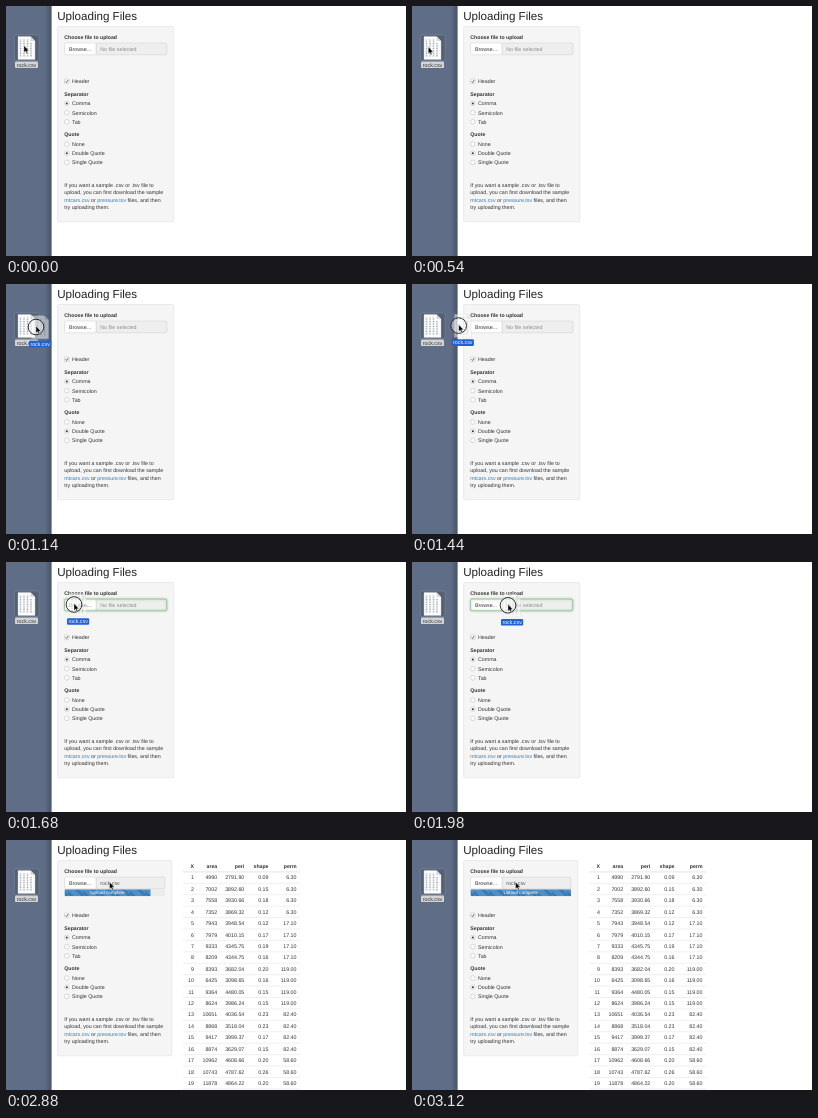
Write an HTML page that moves like this. It is 400x250 px and loops after 4.12 s.

```html
<!DOCTYPE html>
<html lang="en">
<head>
<meta charset="utf-8">
<title>Uploading Files</title>
<style>
html, body { margin: 0; width: 100%; height: 100%; overflow: hidden; background: #fff; }
svg { display: block; }
text { font: 5.3px "Liberation Sans", Arial, sans-serif; fill: #333; text-rendering: geometricPrecision; white-space: pre; }
.b { font-weight: bold; font-size: 5.2px; }
.h { font-size: 11.6px; fill: #222; }
.m { text-anchor: middle; }
.e { text-anchor: end; }
.link { fill: #337ab7; }
</style>
</head>
<body>
<svg id="stage" width="400" height="250" viewBox="0 0 400 250">
  <defs>
    <linearGradient id="edge"><stop stop-color="#222b3a" stop-opacity="0"/><stop offset="1" stop-color="#222b3a" stop-opacity=".4"/></linearGradient>
    <pattern id="stripes" width="15.5" height="15.5" patternUnits="userSpaceOnUse">
      <path d="M0 0H3.9L15.5 11.6V15.5H11.6L0 3.9ZM7.75 0H11.6L15.5 3.9V7.75ZM0 7.75L7.75 15.5H3.9L0 11.6Z" fill="#fff" opacity=".16"/>
    </pattern>
    <clipPath id="track"><rect x="58.5" y="49.3" width="102.5" height="7" rx="1"/></clipPath>
    <g id="doc">
      <path d="M12 30.5H24.5L29 35V53.5H12Z" fill="#fdfdfd" stroke="#c4c7cc" stroke-width=".4"/>
      <path d="M24.5 30.5V35H29Z" fill="#d5d8dc"/>
      <path d="M14.5 33.5V51M18 33.5V51M21.5 33.5V51M25 37V51" stroke="#a9adb3" stroke-width="1.5" stroke-dasharray="1 .7"/>
    </g>
  </defs>

  <rect width="45.5" height="250" fill="#5f6e86"/>
  <rect x="39" width="6.5" height="250" fill="url(#edge)"/>
  <rect x="8.5" y="29" width="24.5" height="25.5" rx="1.5" fill="#4c5668" fill-opacity=".6" stroke="#8b94a3" stroke-width=".4"/>
  <use href="#doc"/>
  <rect x="9" y="55.5" width="23" height="6.6" rx="1.2" fill="#d2d4d7"/>
  <text class="m" x="20.5" y="60.6">rock.csv</text>

  <text class="h" x="51.2" y="14">Uploading Files</text>
  <rect id="panel" x="51.6" y="20.6" height="195.2" rx="1.2" fill="#f5f5f5" stroke="#e0e0e0" stroke-width=".6"/>
  <g id="form"></g>
  <rect id="field" x="90" y="37" height="11.8" rx="1" fill="#eee" stroke="#ccc" stroke-width=".5"/>
  <rect x="58.5" y="37" width="31.5" height="11.8" rx="1.3" fill="#fff" stroke="#ccc" stroke-width=".5"/>
  <text x="63" y="44.9">Browse...</text>
  <text id="value" x="94.3" y="44.9"></text>
  <rect id="glow" x="58.5" y="37" width="102.3" height="11.8" rx="1.3" fill="none" stroke="#8fbf8f" stroke-width=".7" style="filter:drop-shadow(0 0 1.2px rgba(76,174,76,.7))"/>

  <g id="progress" clip-path="url(#track)">
    <rect id="rail" x="58.5" y="49.3" height="7" fill="#ececec"/>
    <rect class="bar" x="58.5" y="49.3" height="7" fill="#337ab7"/>
    <rect class="bar" x="58.5" y="49.3" height="7" fill="url(#stripes)"/>
    <text id="done" class="m" y="54.4" style="fill:#fff;font-size:4.6px">Upload complete</text>
  </g>
  <g id="table"></g>

  <g id="ghost">
    <use href="#doc" opacity=".5"/>
    <rect x="9.4" y="55.5" width="22.2" height="6.6" rx="1.2" fill="#2161d2"/>
    <text class="m" x="20.5" y="60.5" style="fill:#fff">rock.csv</text>
  </g>
  <g id="pointer">
    <circle id="ring" r="7.8" fill="#fff" fill-opacity=".45" stroke="#1c1c1c" stroke-width=".9"/>
    <path d="M0 -1V6L1.6 4.6L2.7 7L3.8 6.5L2.8 4.2H4.9Z" fill="#000" stroke="#fff" stroke-width=".4"/>
  </g>
</svg>
<script>
const $ = id => document.getElementById(id);
const text = (x, y, s, cls = '') => `<text x="${x}" y="${y}" class="${cls}">${s}</text>`;
const set = (el, attrs) => { for (const k in attrs) el.setAttribute(k, attrs[k]); };
const show = (id, on) => { $(id).style.display = on ? '' : 'none'; };

// Form
const radio = (y, label, on) =>
  `<circle cx="60.8" cy="${y}" r="2.3" fill="#fff" stroke="#b5b5b5" stroke-width=".5"/>` +
  (on ? `<circle cx="60.8" cy="${y}" r="1" fill="#333"/>` : '') + text(66, y + 1.9, label);
$('form').innerHTML =
  text(58.3, 33, 'Choose file to upload', 'b') +
  '<rect x="58.5" y="73" width="4.6" height="4.6" rx=".8" fill="#fff" stroke="#b5b5b5" stroke-width=".5"/>' +
  '<path d="M59.6 75.3L60.6 76.5L62.2 74" fill="none" stroke="#333" stroke-width=".7"/>' +
  text(66, 77.2, 'Header') +
  text(58.3, 90, 'Separator', 'b') +
  radio(97.4, 'Comma', true) + radio(106.6, 'Semicolon') + radio(115.8, 'Tab') +
  text(58.3, 130.4, 'Quote', 'b') +
  radio(138, 'None') + radio(147.2, 'Double Quote', true) + radio(156.4, 'Single Quote') +
  ['If you want a sample .csv or .tsv file to',
   'upload, you can first download the sample',
   '<tspan class="link">mtcars.csv</tspan> or <tspan class="link">pressure.tsv</tspan> files, and then',
   'try uploading them.'].map((s, i) => text(58.3, 181 + i * 7.3, s)).join('');

// Table
const area = [4990, 7002, 7558, 7352, 7943, 7979, 9333, 8209, 8393, 6425, 9364, 8624, 10651, 8868, 9417, 8874, 10962, 10743, 11878];
const peri = [2791.9, 3892.6, 3930.66, 3869.32, 3948.54, 4010.15, 4345.75, 4344.75, 3682.04, 3098.65, 4480.05, 3986.24, 4036.54, 3518.04, 3999.37, 3629.07, 4608.66, 4787.62, 4864.22];
const shape = [9, 15, 18, 12, 12, 17, 19, 16, 20, 16, 15, 15, 23, 23, 17, 15, 20, 26, 20];
const perm = [6.3, 17.1, 119, 82.4, 58.6];
const row = (cells, y, cls) => cells.map((s, i) => text([188, 211.2, 238.3, 262.5, 290.5][i], y, s, 'e ' + cls)).join('');
const rule = (y, w) => `<path d="M177 ${y}H294" stroke="#ddd" stroke-width="${w}"/>`;
$('table').innerHTML = row(['X', 'area', 'peri', 'shape', 'perm'], 27.6, 'b') + rule(31.9, .8) +
  area.map((a, i) => {
    const y = 37.5 + i * 11.42;
    return row([i + 1, a, peri[i].toFixed(2), (shape[i] / 100).toFixed(2), perm[i >> 2].toFixed(2)], y + 1.9, '') + rule(y + 5.8, .45);
  }).join('');

// Pointer path: time, x, y
const path = [
  [0, 18, 40.5], [260, 23.5, 46], [540, 16.3, 41.8], [720, 16.3, 41.8], [900, 20.7, 42.6], [1140, 30, 43],
  [1440, 46.7, 41.6], [1680, 68, 42.5], [1980, 96, 43.3], [2200, 103.5, 43]
];
function pointerAt(t) {
  const i = path.findIndex(p => p[0] > t);
  if (i < 0) return path[path.length - 1].slice(1);
  const [a, b] = [path[i - 1], path[i]], k = (t - a[0]) / (b[0] - a[0]);
  return [1, 2].map(j => a[j] + (b[j] - a[j]) * k);
}

// CSS "ease" curve
function ease(x) {
  const bez = (p, q, s) => 3 * p * s * (1 - s) ** 2 + 3 * q * s * s * (1 - s) + s ** 3;
  let lo = 0, hi = 1;
  for (let i = 0; i < 20; i++) {
    const mid = (lo + hi) / 2;
    if (bez(.25, .25, mid) < x) lo = mid; else hi = mid;
  }
  return bez(.1, 1, lo);
}

const GRAB = 720, DROP = 2560, LOADED = 2700;

function draw(t) {
  const [x, y] = pointerAt(t);
  set($('pointer'), { transform: `translate(${x} ${y})` });
  set($('ghost'), { transform: `translate(${x - 16.4} ${y - 41.8})` });
  show('ring', t >= 660 && t < 2200);
  show('ghost', t >= GRAB && t < DROP);
  show('glow', t >= 1600 && t < DROP);

  const dropped = t >= DROP, loaded = t >= LOADED, right = loaded ? 159 : 161;
  set($('panel'), { width: right - 44.8 });
  set($('field'), { width: right - 90.2 });
  set($('rail'), { width: right - 58.5 });
  $('value').textContent = dropped ? 'rock.csv' : 'No file selected';
  $('value').style.fill = dropped ? '#555' : '#8c8c8c';
  show('table', loaded);
  show('progress', dropped);

  const width = (right - 58.5) * ease(Math.min(1, Math.max(0, (t - 2575) / 545)));
  document.querySelectorAll('.bar').forEach(el => set(el, { width }));
  set($('done'), { x: 58.5 + Math.max(width / 2, 17.5) });
}

function tick() {
  const t = performance.now() % 4120;
  draw(Math.min(3120, Math.floor(t / 60) * 60));
  requestAnimationFrame(tick);
}
tick();
</script>
</body>
</html>
```
